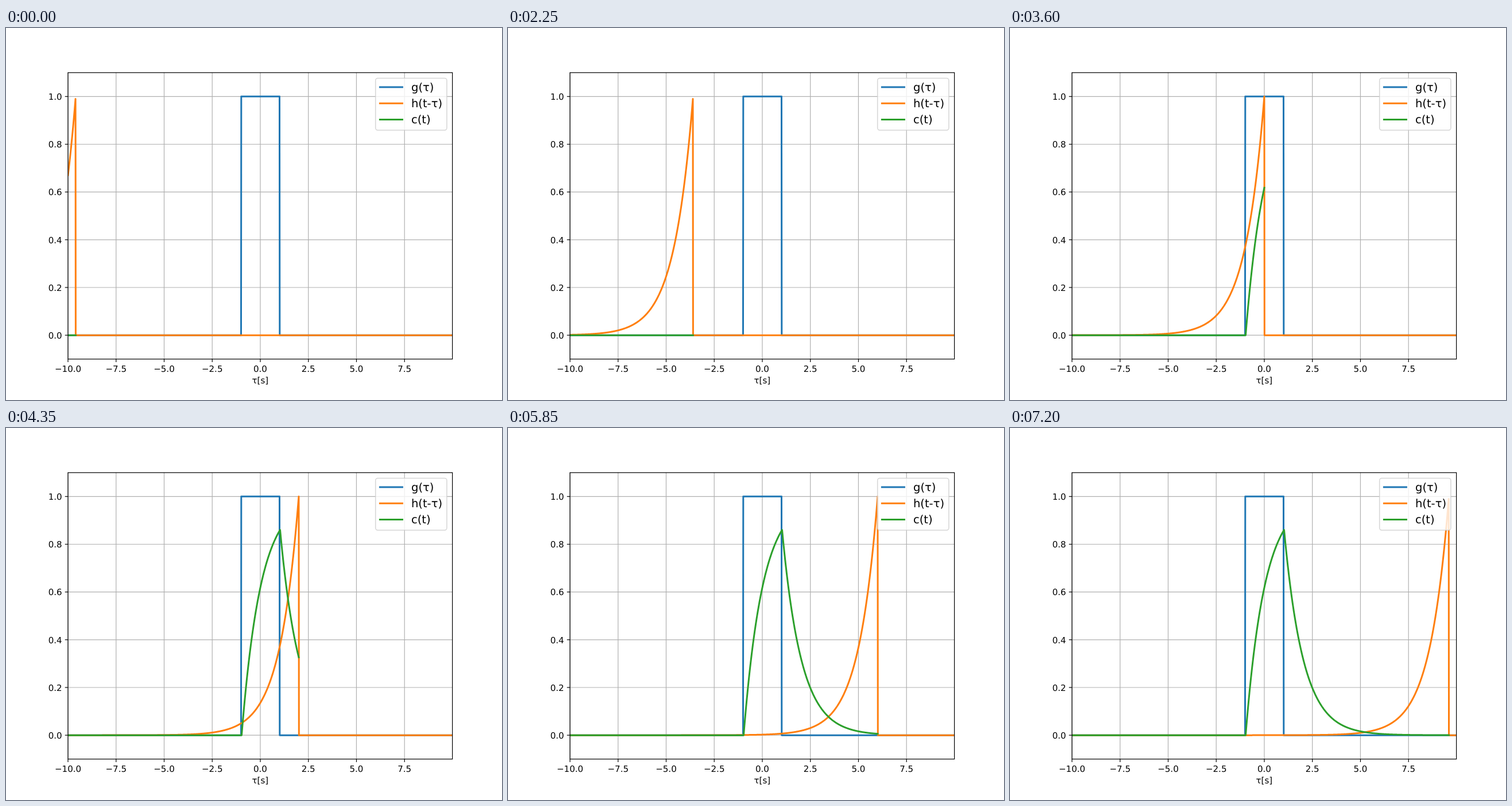
Animation of 864 by 648 pixels, one loop 7.35 s. Source, as an HTML page:

```html
<!DOCTYPE html>
<html lang="en">
<head>
<meta charset="utf-8">
<title>Convolution</title>
<style>
  html, body { margin: 0; width: 100%; height: 100%; overflow: hidden; background: #fff; }
  svg { display: block; }
  text { font: 15px "DejaVu Sans", sans-serif; fill: #000; text-rendering: geometricPrecision; }
  .legend { font-size: 19.5px; }
  .curve { fill: none; stroke-width: 3; stroke-linejoin: round; stroke-linecap: square; }
  .grid { stroke: #b0b0b0; stroke-width: 1.2; }
  .tick { stroke: #000; stroke-width: 1.2; }
</style>
</head>
<body>
<svg id="stage" width="864" height="648" viewBox="0 0 864 648"></svg>
<script>
const stage = document.getElementById("stage");
const LEFT = 108, RIGHT = 777.6, TOP = 77.76, BOTTOM = 576.72;
const STEP = 0.01, COUNT = 2000, DELAY = 0.02;
const TICK = 5.25;
const FRAME_MS = 150, FRAMES = 49;
const COLORS = ["#1f77b4", "#ff7f0e", "#2ca02c"];

const px = x => LEFT + (x + 10) / 19.99 * (RIGHT - LEFT);
const py = y => BOTTOM - (y + 0.1) / 1.2 * (BOTTOM - TOP);
const xAt = i => (i - COUNT / 2) * STEP;

function add(tag, attrs, parent = stage, content = "") {
  const el = document.createElementNS("http://www.w3.org/2000/svg", tag);
  for (const key in attrs) el.setAttribute(key, attrs[key]);
  el.textContent = content;
  return parent.appendChild(el);
}

function line(x1, y1, x2, y2, cls, extra) {
  return add("line", { x1, y1, x2, y2, class: cls, ...extra });
}

function label(x, y, anchor, content, cls = "") {
  add("text", { x, y, "text-anchor": anchor, class: cls }, stage, content);
}

// Path through samples 0..count-1 of f(index).
function trace(f, count) {
  let d = "";
  for (let i = 0; i < count; i++) {
    d += (i ? "L" : "M") + px(xAt(i)).toFixed(2) + " " + py(f(i)).toFixed(2);
  }
  return d;
}

const pulse = i => (i > 900 && i <= 1100 ? 1 : 0);

// Sampled convolution of the pulse with the decaying exponential.
function convolved(i) {
  const sinceRise = xAt(i) + 0.99 - DELAY;
  const gain = STEP / (Math.exp(STEP) - 1);
  if (sinceRise <= 0) return 0;
  if (sinceRise <= 2) return gain * (1 - Math.exp(-sinceRise));
  return gain * (1 - Math.exp(-2)) * Math.exp(2 - sinceRise);
}

const box = { x: LEFT, y: TOP, width: RIGHT - LEFT, height: BOTTOM - TOP };
add("rect", box, add("clipPath", { id: "axes" }));

for (let k = 0; k < 8; k++) {
  const value = -10 + 2.5 * k, x = px(value);
  line(x, TOP, x, BOTTOM, "grid");
  line(x, BOTTOM, x, BOTTOM + TICK, "tick");
  label(x, 598.6, "middle", value.toFixed(1).replace("-", "\u2212"));
}
for (let k = 0; k <= 5; k++) {
  const value = k / 5, y = py(value);
  line(LEFT, y, RIGHT, y, "grid");
  line(LEFT - TICK, y, LEFT, y, "tick");
  label(LEFT - 2 * TICK, y + 5.7, "end", value.toFixed(1));
}
label((LEFT + RIGHT) / 2, 619.4, "middle", "τ[s]");

const plot = add("g", { "clip-path": "url(#axes)" });
const [pulsePath, decayPath, resultPath] =
  COLORS.map(stroke => add("path", { class: "curve", stroke }, plot));
pulsePath.setAttribute("d", trace(pulse, COUNT));

add("rect", { ...box, fill: "none", stroke: "#000", "stroke-width": 1.2 });

add("rect", { x: 643.7, y: 87.5, width: 124.2, height: 90.5, rx: 3.9,
  fill: "#fff", "fill-opacity": 0.8,
  stroke: "#ccc", "stroke-opacity": 0.8, "stroke-width": 1.5 });
["g(τ)", "h(t-τ)", "c(t)"].forEach((name, k) => {
  const y = 103.1 + 28.15 * k;
  line(651.4, y, 690.4, y, "curve", { stroke: COLORS[k] });
  label(706, y + 6.8, "start", name, "legend");
});

let shown = -1;
function draw(ms) {
  const n = Math.floor(ms / FRAME_MS) % FRAMES;
  if (n === shown) return;
  shown = n;
  const front = 40 * (n + 1);
  // Rounding decides whether the sample on the front itself is kept.
  const last = n % 15 > 7 ? front : front - 1;
  const decay = i => (i <= last ? Math.exp((i - front) * STEP) : 0);
  decayPath.setAttribute("d", trace(decay, COUNT));
  resultPath.setAttribute("d", trace(convolved, front + 1));
}

const start = performance.now();
function tick() {
  draw(performance.now() - start);
  requestAnimationFrame(tick);
}
tick();
</script>
</body>
</html>
```
